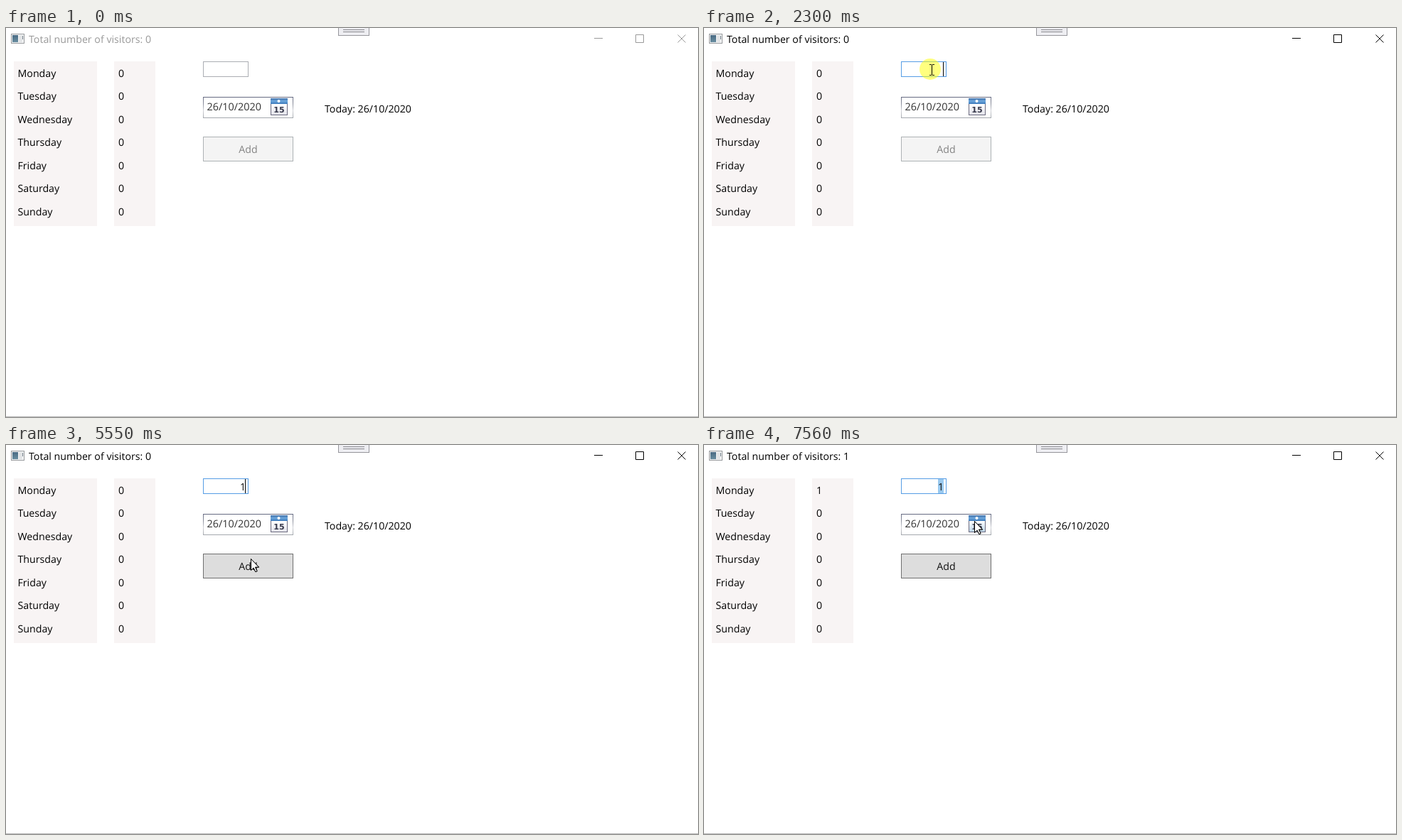
Animation of 973x548 px, one loop 8 s. Source, as an HTML page with a canvas:

```html
<!DOCTYPE html>
<html lang="en">
<head>
<meta charset="utf-8">
<title>Visitors</title>
<style>
  html, body { margin: 0; width: 100%; height: 100%; overflow: hidden; background: #fff; }
  canvas { display: block; }
</style>
</head>
<body>
<canvas id="stage" width="973" height="548"></canvas>
<script>
const ctx = document.getElementById('stage').getContext('2d');
const LOOP = 8000;
const DAYS = ['Monday', 'Tuesday', 'Wednesday', 'Thursday', 'Friday', 'Saturday', 'Sunday'];
const DATE = '26/10/2020';
const FONT = '14.2px "Open Sans", "Noto Sans", sans-serif';
const BUTTON = {
  disabled: ['#f4f4f4', '#adb2b5', '#838383'],
  normal: ['#dddddd', '#707070', '#111'],
  hover: ['#bee6fd', '#3c7fb1', '#111'],
  pressed: ['#c4e5f6', '#2c628b', '#111']
};
// Pointer strokes: start, end, number of steps, then a quadratic curve.
const MOVES = [
  { from: 920, to: 1680, steps: 10, path: [[875, 540], [888, 438], [506, 84]] },
  { from: 1680, to: 2300, steps: 8, path: [[506, 84], [365, 48], [320, 58]] },
  { from: 5020, to: 5630, steps: 8, path: [[320, 58], [353, 132], [342, 170]] },
  { from: 6410, to: 6870, steps: 1, path: [[339, 174], [339, 174], [339, 175]] },
  { from: 7023, to: 7560, steps: 7, path: [[339, 175], [366, 130], [380, 107]] }
];
const CARET_FLIPS = [2300, 2910, 3380, 3930, 4560, 5020, 5550, 6090];

function fill(x, y, w, h, color) {
  ctx.fillStyle = color;
  ctx.fillRect(x, y, w, h);
}

function box(x, y, w, h, background, border) {
  fill(x, y, w, h, background);
  ctx.strokeStyle = border;
  ctx.strokeRect(x + .5, y + .5, w - 1, h - 1);
}

function text(string, x, y, color = '#000', font = FONT, align = 'left') {
  ctx.font = font;
  ctx.textAlign = align;
  ctx.fillStyle = color;
  ctx.fillText(string, x, y);
}

function gradient(y0, y1, ...colors) {
  const g = ctx.createLinearGradient(0, y0, 0, y1);
  colors.forEach((c, i) => g.addColorStop(i / (colors.length - 1), c));
  return g;
}

function pointerAt(t) {
  const move = MOVES.filter(m => t >= m.from).pop();
  if (!move) return null;
  const stepTime = (move.to - move.from) / move.steps;
  const u = Math.min(1, Math.floor((t - move.from + 6) / stepTime) / move.steps);
  const [a, b, c] = move.path;
  return [0, 1].map(i =>
    Math.round((1 - u) ** 2 * a[i] + 2 * u * (1 - u) * b[i] + u * u * c[i]));
}

const inside = (p, x, y, w, h) => !!p && p[0] >= x && p[0] < x + w && p[1] >= y && p[1] < y + h;

function drawTitleBar(active, count) {
  box(7, 8, 19, 14, '#f4f5f6', '#979a9d');
  fill(9, 10, 8, 10, gradient(10, 20, '#4a6b84', '#688da0'));
  fill(18, 10, 5, 10, '#e2e4e6');
  fill(23, 11, 1, 5, '#75828c');
  text('Total number of visitors: ' + count, 32, 21, active ? '#000' : '#999');

  ctx.strokeStyle = active ? '#000' : '#999';
  ctx.beginPath();
  ctx.moveTo(827, 14.5);
  ctx.lineTo(839, 14.5);
  ctx.rect(885.5, 9.5, 11, 11);
  ctx.moveTo(944.5, 9.5);
  ctx.lineTo(955.5, 20.5);
  ctx.moveTo(955.5, 9.5);
  ctx.lineTo(944.5, 20.5);
  ctx.stroke();

  box(467, -2, 44, 13, '#eeeef2', '#96969c');
  fill(474, 2, 30, 1, '#85858b');
  fill(474, 5, 30, 1, '#85858b');
}

function drawTable(count) {
  fill(11, 47, 117, 232, '#f8f4f4');
  fill(152, 47, 58, 232, '#f8f4f4');
  DAYS.forEach((day, i) => {
    const y = Math.round(69 + 32.5 * i - .1);
    text(day, 16.5, y);
    text(i ? 0 : count, 158, y);
  });
}

function drawDatePicker(hover) {
  box(277, 97, 127, 30, '#fff', gradient(97, 126, '#686c84', '#8b8e9c', '#d4d5da', '#a4a8ae'));
  fill(277, 97, 127, 1, '#666b82');
  text(DATE, 282.5, 116, '#333', '14.4px "Open Sans", "Noto Sans", sans-serif');

  const page = hover ? gradient(107, 123, '#fff', '#b9d4e8') : gradient(107, 123, '#fff', '#e2e2ea');
  box(372, 99, 24, 24, page, '#6d6c80');
  fill(372, 99, 24, 8, gradient(99, 107, '#3f6fa9', '#6ea8dd', '#3977b9'));
  ctx.fillStyle = '#fff';
  ctx.beginPath();
  ctx.arc(383.5, 103, 2, 0, 7);
  ctx.fill();
  text('15', 384, 119, '#36384a', 'bold 11px "DejaVu Sans", sans-serif', 'center');
}

function drawTextBox(t, hover) {
  const focused = t >= 2300;
  box(277, 47, 64, 22, '#fff', focused ? '#569de5' : hover ? '#7eb4ea' : '#abadb3');
  if (t >= 6490) fill(329, 48, 8, 20, '#99c9ef');
  if (t >= 4160) text('1', 337, 64, '#111', FONT, 'right');
  const flips = CARET_FLIPS.filter(time => t >= time).length;
  if (flips % 2) fill(336, 48, 1, 20, '#000');
}

function drawButton(state) {
  const [background, border, label] = BUTTON[state];
  box(277, 153, 127, 35, background, border);
  text('Add', 340.5, 176, label, FONT, 'center');
}

function drawHighlight(x, y) {
  ctx.fillStyle = 'rgba(255, 255, 0, .5)';
  ctx.beginPath();
  ctx.arc(x, y, 15, 0, 7);
  ctx.fill();
}

function drawArrow(x, y) {
  ctx.save();
  ctx.translate(x + .5, y + .5);
  ctx.fillStyle = '#fff';
  ctx.strokeStyle = '#000';
  ctx.stroke(arrow);
  ctx.fill(arrow);
  ctx.stroke(arrow);
  ctx.restore();
}
const arrow = new Path2D('M0 0V16L3.6 12.6L6.4 18.2L8.6 17.2L6 11.6H11Z');

function drawBeam(x, y) {
  fill(x, y - 6, 1, 14, '#000');
  for (const edge of [y - 7, y + 8]) {
    fill(x - 3, edge, 3, 1, '#000');
    fill(x + 1, edge, 3, 1, '#000');
  }
}

function draw(t) {
  const pointer = pointerAt(t);
  const overInput = inside(pointer, 277, 47, 64, 22);
  const overDate = inside(pointer, 278, 98, 90, 28);
  const overButton = t >= 5630 && inside(pointer, 277, 153, 127, 35);
  const pressed = t >= 6410 && t < 6490;
  const count = t >= 6490 ? 1 : 0;

  fill(0, 0, 973, 548, '#fff');
  fill(0, 547, 973, 1, '#bababa');
  drawTitleBar(t >= 2300, count);
  drawTable(count);
  drawTextBox(t, overInput);
  drawDatePicker(inside(pointer, 372, 99, 24, 24));
  text('Today: ' + DATE, 448, 119);
  drawButton(t < 4160 ? 'disabled' : pressed ? 'pressed' : overButton ? 'hover' : 'normal');

  if (t >= 2300 && t < 2530) drawHighlight(318, 58);
  if (pressed) drawHighlight(339, 174);
  const hiddenByTyping = t >= 4160 && t < 5020;
  if (pointer && !hiddenByTyping) (overInput || overDate ? drawBeam : drawArrow)(...pointer);
}

ctx.lineWidth = 1;
ctx.textRendering = 'geometricPrecision';
const start = performance.now();
function tick() {
  draw((performance.now() - start) % LOOP);
  requestAnimationFrame(tick);
}
tick();
</script>
</body>
</html>
```
